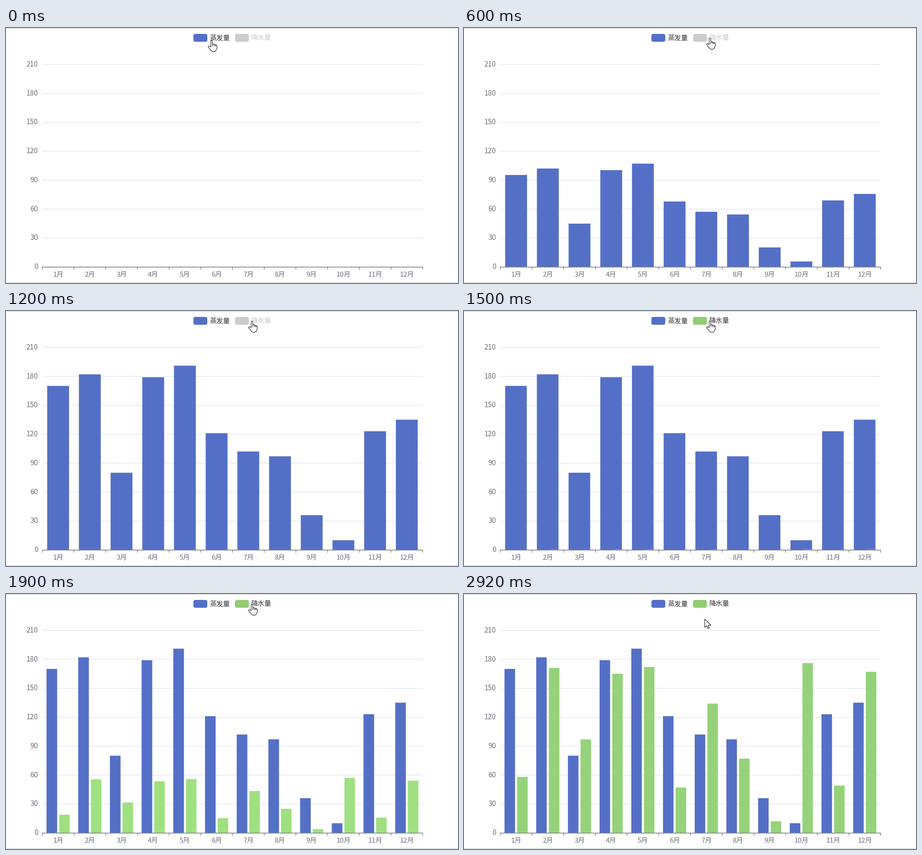
Animation of 997 by 562 pixels, one loop 3140 ms. Source, as a matplotlib script:

```python
import numpy as np
import matplotlib.pyplot as plt
from matplotlib.animation import FuncAnimation
from matplotlib.colors import to_rgb
from matplotlib.patches import FancyBboxPatch, PathPatch, Rectangle
from matplotlib.path import Path

W, H, DPI = 997, 562, 64
LOOP, STEP = 3140, 20
PX = 72 / DPI
FONT = "Noto Sans CJK JP"

LEFT, RIGHT, BASE, UNIT = 80, 919, 526.5, 2.126
BAND = (RIGHT - LEFT) / 12
EVAPORATION = [170, 182, 80, 179, 191, 121, 102, 97, 36, 10, 123, 135]
RAINFALL = [58, 171, 97, 165, 172, 47, 134, 77, 12, 176, 49, 167]

BLUE, BLUE_HOVER = "#5470c6", "#5c7bd9"
GREEN, GREEN_HOVER, GREEN_REST = "#91cc75", "#9fe080", "#95d27a"
GRID, AXIS, OFF, INK = "#e0e6f1", "#6e7079", "#cccccc", "#333333"

# Cursor track: time, x, y of the top of the pointer
TRACK = np.array([
    (0, 455, 27), (100, 458, 27), (200, 492, 22), (300, 533, 21),
    (400, 544, 22), (2500, 544, 22), (2600, 542, 28), (2700, 536, 42),
    (2800, 532, 52), (2900, 531, 54.5), (2920, 531, 55),
])

fig = plt.figure(figsize=(W / DPI, H / DPI), dpi=DPI, facecolor="white")
ax = fig.add_axes([0, 0, 1, 1])
ax.set_xlim(0, W)
ax.set_ylim(H, 0)
ax.axis("off")


def box(x, y, w, h, color, z):
    return ax.add_patch(Rectangle((x, y), w, h, fc=color, lw=0, snap=False, zorder=z))


def label(x, y, text, size, color, ha):
    return ax.text(x, y, text, family=FONT, fontsize=size * PX, color=color,
                   ha=ha, va="baseline", zorder=5)


def legend_item(x, text, color, ink):
    icon = ax.add_patch(FancyBboxPatch(
        (x, 13), 30.6, 17.4, boxstyle="round,pad=0,rounding_size=4.4",
        fc=color, lw=0, zorder=5))
    return icon, label(x + 35.6, 26.3, text, 14.9, ink, "left")


def cubic_in_out(t):
    t = min(max(t, 0), 1)
    return 4 * t ** 3 if t < 0.5 else 1 - 4 * (1 - t) ** 3


def cubic_out(t):
    t = min(max(t, 0), 1)
    return 1 - (1 - t) ** 3


def mix(a, b, p):
    return tuple((1 - p) * np.array(to_rgb(a)) + p * np.array(to_rgb(b)))


# Page edges, grid and axes
box(0, 0, W, 1, "#c4c4c4", 1)
box(0, H - 1, W, 1, "#c4c4c4", 1)
for value in range(0, 211, 30):
    y = BASE - value * UNIT
    if value:
        box(LEFT, y - 0.4, RIGHT - LEFT, 1.4, GRID, 1)
    label(70.8, y + 4.7, str(value), 15.6, AXIS, "right")
box(LEFT, BASE - 0.3, RIGHT - LEFT, 1.4, AXIS, 4)
for i in range(13):
    box(LEFT + i * BAND - 0.5, BASE, 1.25, 6, AXIS, 4)
for i in range(12):
    label(LEFT + (i + 0.5) * BAND, 548, f"{i + 1}月", 15, AXIS, "center")

legend_item(413.4, "蒸发量", BLUE, INK)
rain_icon, rain_text = legend_item(505.2, "降水量", OFF, OFF)

blue_bars = [box(0, BASE, 0, 0, BLUE, 2) for _ in range(12)]
green_bars = [box(0, BASE, 0, 0, GREEN, 3) for _ in range(12)]

# Pointers, drawn around their top point
M, L, Q = Path.MOVETO, Path.LINETO, Path.CURVE3
HAND = [
    (M, -3.2, 15), (L, -3.2, 2), (Q, -3.2, 0.3), (Q, -1.4, 0.3),
    (Q, 0.4, 0.3), (Q, 0.4, 2), (L, 0.4, 8.5), (Q, 3.8, 7.2), (Q, 4, 9.6),
    (Q, 7, 8.6), (Q, 7.2, 10.8), (Q, 10.3, 9.8), (Q, 10.3, 12.6),
    (L, 10.3, 16.5), (Q, 10.2, 19), (Q, 8, 22), (Q, 7.2, 25), (Q, 3, 25),
    (Q, -1.5, 25), (Q, -3.5, 21.5), (L, -8.3, 15.6), (Q, -9.6, 13.4),
    (Q, -7.6, 12.7), (Q, -6, 12.3), (Q, -3.2, 15),
    (M, 0.4, 8.5), (L, 0.4, 13), (M, 4, 9.6), (L, 4, 13.4),
    (M, 7.2, 10.8), (L, 7.2, 14),
]
ARROW = [
    (M, 0, 0), (L, 0, 18.8), (L, 4.2, 15), (L, 7, 21.2), (L, 9.8, 20),
    (L, 7.2, 13.9), (L, 13.6, 13.6), (L, 0, 0),
]


def pointer_path(shape, x, y):
    return Path([(x + dx, y + dy) for _, dx, dy in shape], [c for c, _, _ in shape])


pointer = ax.add_patch(PathPatch(pointer_path(HAND, 0, 0), fc="white", ec="#1c1c24",
                                 lw=1.15 * PX, snap=False, zorder=9))


def place(bars, values, offset, width, grow, color):
    for i, (bar, value) in enumerate(zip(bars, values)):
        height = value * UNIT * grow
        bar.set_bounds(LEFT + (i + 0.5) * BAND + offset, BASE - height, width, height)
        bar.set_facecolor(color)


def draw(frame):
    ms = frame * STEP
    # The picture advances ten times a second, then rests
    ms = 2920 if ms >= 2920 else ms // 100 * 100

    blue_time = 0.068 + 0.000755 * ms
    green_time = 0.0008 + 0.000864 * (ms - 1400)

    squeeze = cubic_in_out(2 * green_time)
    place(blue_bars, EVAPORATION, -24.1 - 1.5 * squeeze, 48.2 - 25 * squeeze,
          cubic_in_out(blue_time), mix(BLUE_HOVER, BLUE, cubic_out((ms - 200) / 350)))
    place(green_bars, RAINFALL, 2.3, 23.2, cubic_in_out(green_time),
          mix(GREEN_HOVER, GREEN_REST, cubic_out((ms - 2200) / 300)))

    active = ms >= 1400
    rain_icon.set_facecolor(GREEN if active else OFF)
    rain_text.set_color(INK if active else OFF)

    x = np.interp(ms, TRACK[:, 0], TRACK[:, 1])
    y = np.interp(ms, TRACK[:, 0], TRACK[:, 2])
    pointer.set_path(pointer_path(ARROW if y > 31 else HAND, x, y))
    return [*blue_bars, *green_bars, rain_icon, rain_text, pointer]


anim = FuncAnimation(fig, draw, frames=LOOP // STEP, interval=STEP,
                     repeat=True, repeat_delay=0, blit=False)
plt.show()
```
